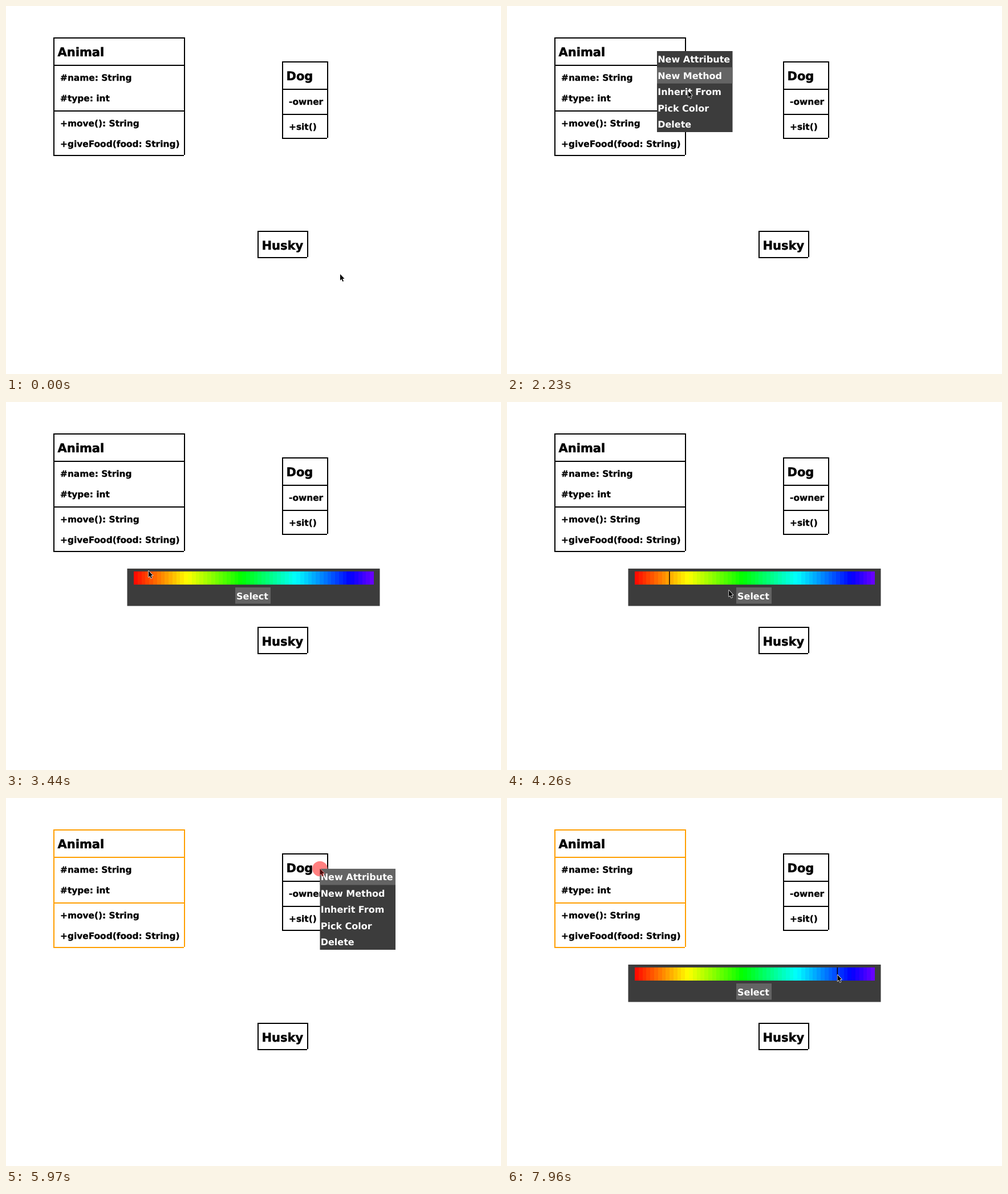
Animation, 868 px wide and 645 px high, one loop 8000 ms. Source, as an HTML page:

```html
<!DOCTYPE html>
<html lang="en">
<head>
<meta charset="utf-8">
<title>Class diagram editor</title>
<style>
  html, body { margin: 0; width: 100%; height: 100%; overflow: hidden; background: #fff; }
  svg { display: block; width: 868px; height: 645px; }
  text {
    font: bold 15.4px "DejaVu Sans", Verdana, sans-serif;
    fill: #000; stroke: #000; stroke-width: .3px;
    text-rendering: geometricPrecision;
  }
  .title { font-size: 21px; stroke-width: .5px; }
  .light { font-size: 16px; fill: #fff; stroke: none; }
  .frame { fill: none; stroke: #000; stroke-width: 2px; }
</style>
</head>
<body>
<svg id="stage" viewBox="0 0 868 645" xmlns="http://www.w3.org/2000/svg"></svg>
<script>
const LOOP = 8000, STEP = 70;
const PANEL = '#3c3c3c', ACTIVE = '#646464', HOVER = '#8c8c8c';
const TITLE_H = 48, LINE_H = 36, ROW_H = 28.4;
const BAR = { x: 224, y: 297, w: 421, h: 23, cells: 62 };
const BUTTON = { x: 402, y: 325, w: 62, h: 28.5 };
const stage = document.getElementById('stage');

function add(parent, tag, attrs, text) {
  const el = document.createElementNS('http://www.w3.org/2000/svg', tag);
  set(el, attrs);
  if (text) el.textContent = text;
  parent.appendChild(el);
  return el;
}
function set(el, attrs) {
  for (const key in attrs) el.setAttribute(key, attrs[key]);
}

const group = () => add(stage, 'g', {});
const rect = (parent, x, y, width, height, fill) =>
  add(parent, 'rect', { x, y, width, height, fill });
const label = (parent, x, y, text, cls = '') =>
  add(parent, 'text', { x, y, class: cls }, text);
const show = (el, on) => { el.style.display = on ? '' : 'none'; };
const inside = (x, y, b) => x > b.x && x < b.x + b.w && y > b.y && y < b.y + b.h;

// A title row, then one compartment per list of members.
function classBox(x, y, w, title, ...parts) {
  let bottom = y + TITLE_H, rules = '';
  label(stage, x + 6.5, y + 31.5, title, 'title');
  for (const part of parts) {
    rules += `M${x} ${bottom}H${x + w}`;
    part.forEach((text, i) => label(stage, x + 11, bottom + 27.3 + i * LINE_H, text));
    bottom += 8 + part.length * LINE_H;
  }
  bottom -= 2;
  const frame = add(stage, 'path', {
    class: 'frame',
    d: `M${x + w} ${bottom - 1}V${y}H${x}V${bottom}H${x + w - 1}${rules}`
  });
  return { x, y, w, h: bottom - y, frame };
}

const boxes = [
  classBox(84, 56, 229, 'Animal',
    ['#name: String', '#type: int'], ['+move(): String', '+giveFood(food: String)']),
  classBox(485, 98, 79, 'Dog', ['-owner'], ['+sit()']),
  classBox(442, 395, 87, 'Husky')
];

const ring = { right: add(stage, 'circle', { r: 13.3, fill: '#ff8080' }) };

// Context menu
const menu = group();
rect(menu, 0, 0, 132.5, ROW_H * 5, PANEL);
const rowMark = rect(menu, 0, 0, 132.5, ROW_H, ACTIVE);
['New Attribute', 'New Method', 'Inherit From', 'Pick Color', 'Delete'].forEach(
  (name, i) => label(menu, 1.2, 20.4 + i * ROW_H, name, 'light'));

// Colour picker
const hueColor = f =>
  `hsl(${3 + 261 * Math.floor(f * BAR.cells) / (BAR.cells - 1)} 100% 50%)`;
const picker = group();
rect(picker, 212.5, 292, 443, 65.5, PANEL);
for (let i = 0; i < BAR.cells; i++) {
  const w = BAR.w / BAR.cells;
  set(rect(picker, BAR.x + i * w, BAR.y, w, BAR.h, hueColor((i + .5) / BAR.cells)),
    { 'shape-rendering': 'crispEdges' });
}
const button = rect(picker, BUTTON.x, BUTTON.y, BUTTON.w, BUTTON.h, ACTIVE);
label(picker, 404, 345.6, 'Select', 'light');
const marker = rect(picker, 0, BAR.y, 1.4, BAR.h, '#000');

ring.left = add(stage, 'circle', { r: 13.3, fill: '#ffff80' });
const arrow = add(stage, 'path', {
  d: 'M0 0V11L2.4 8.8L4.3 13L6 12.2L4.2 8.1H7.5Z',
  'stroke-width': 1.4, 'paint-order': 'stroke', 'stroke-linejoin': 'round'
});
const arrowTint = { left: '#6e5a08', right: '#4a0c0c' };

// Pointer trips along a curve to a spot, most ending in a click.
const home = [586, 470];
const trips = [
  { go: 590, stop: 1430, via: [208, -24], to: [263, 79], press: 1760, hold: 130, kind: 'right' },
  { go: 2160, stop: 2500, via: [308, 128], to: [334, 177], press: 2700, hold: 70, kind: 'left' },
  { go: 2970, stop: 3390, via: [530, 235], to: [250, 296] },
  { go: 3460, stop: 3720, via: [265, 302], to: [285, 304], press: 3790, hold: 200, kind: 'left' },
  { go: 4190, stop: 4540, via: [360, 325], to: [432, 339], press: 4810, hold: 70, kind: 'left' },
  { go: 5080, stop: 5640, via: [490, 230], to: [550.5, 124], press: 5970, hold: 70, kind: 'right' },
  { go: 6370, stop: 6860, via: [585, 190], to: [608, 228], press: 6930, hold: 70, kind: 'left' },
  { go: 7200, stop: 7760, via: [626, 361], to: [579.5, 310], press: 7830, hold: 130, kind: 'left' }
];

const easeOut = p => 1 - (1 - p) ** 3;

function pointer(t) {
  const i = trips.filter(trip => trip.go <= t).length - 1;
  if (i < 0) return home;
  const { go, stop, via, to } = trips[i];
  const from = i ? trips[i - 1].to : home;
  const steps = Math.floor((t - go) / STEP) + 1;
  const f = easeOut(Math.min(1, steps * STEP / (stop - go + STEP)));
  return from.map((a, k) => a * (1 - f) ** 2 + 2 * via[k] * f * (1 - f) + to[k] * f * f);
}

// Replays every click up to time t.
function stateAt(t) {
  const s = { menu: null, picker: false, mark: null, box: null, colors: new Map() };
  for (const { press, to, kind } of trips) {
    if (!(press <= t)) continue;
    if (kind === 'right') {
      s.menu = to;
      s.box = boxes.find(b => inside(...to, b));
    } else if (s.menu) {
      s.menu = null;
      s.picker = true;
    } else if (inside(...to, BAR)) {
      s.mark = to[0];
    } else if (inside(...to, BUTTON)) {
      s.colors.set(s.box, hueColor((s.mark - BAR.x) / BAR.w));
      s.picker = false;
      s.mark = null;
    }
  }
  return s;
}

function draw(t) {
  const [x, y] = pointer(t);
  const s = stateAt(t);

  const click = trips.find(c => t >= c.press && t < c.press + c.hold);
  for (const kind in ring) {
    const on = click && click.kind === kind;
    show(ring[kind], on);
    if (on) set(ring[kind], { cx: click.to[0], cy: click.to[1] });
  }
  set(arrow, {
    transform: `translate(${x} ${y})`,
    fill: click ? arrowTint[click.kind] : '#000',
    stroke: click ? ring[click.kind].getAttribute('fill') : '#fff'
  });

  show(menu, s.menu);
  if (s.menu) {
    // The highlighted row trails the pointer by one step.
    const row = Math.floor((pointer(t - STEP)[1] - s.menu[1]) / ROW_H);
    set(menu, { transform: `translate(${s.menu})` });
    set(rowMark, { y: Math.min(4, Math.max(0, row)) * ROW_H });
  }

  show(picker, s.picker);
  show(marker, s.mark);
  set(marker, { x: s.mark - .8 });
  set(button, { fill: inside(x, y, BUTTON) ? HOVER : ACTIVE });
  boxes.forEach(b => { b.frame.style.stroke = s.colors.get(b) || '#000'; });
}

const begin = performance.now();
function tick() {
  draw((performance.now() - begin) % LOOP);
  requestAnimationFrame(tick);
}
tick();
</script>
</body>
</html>
```
